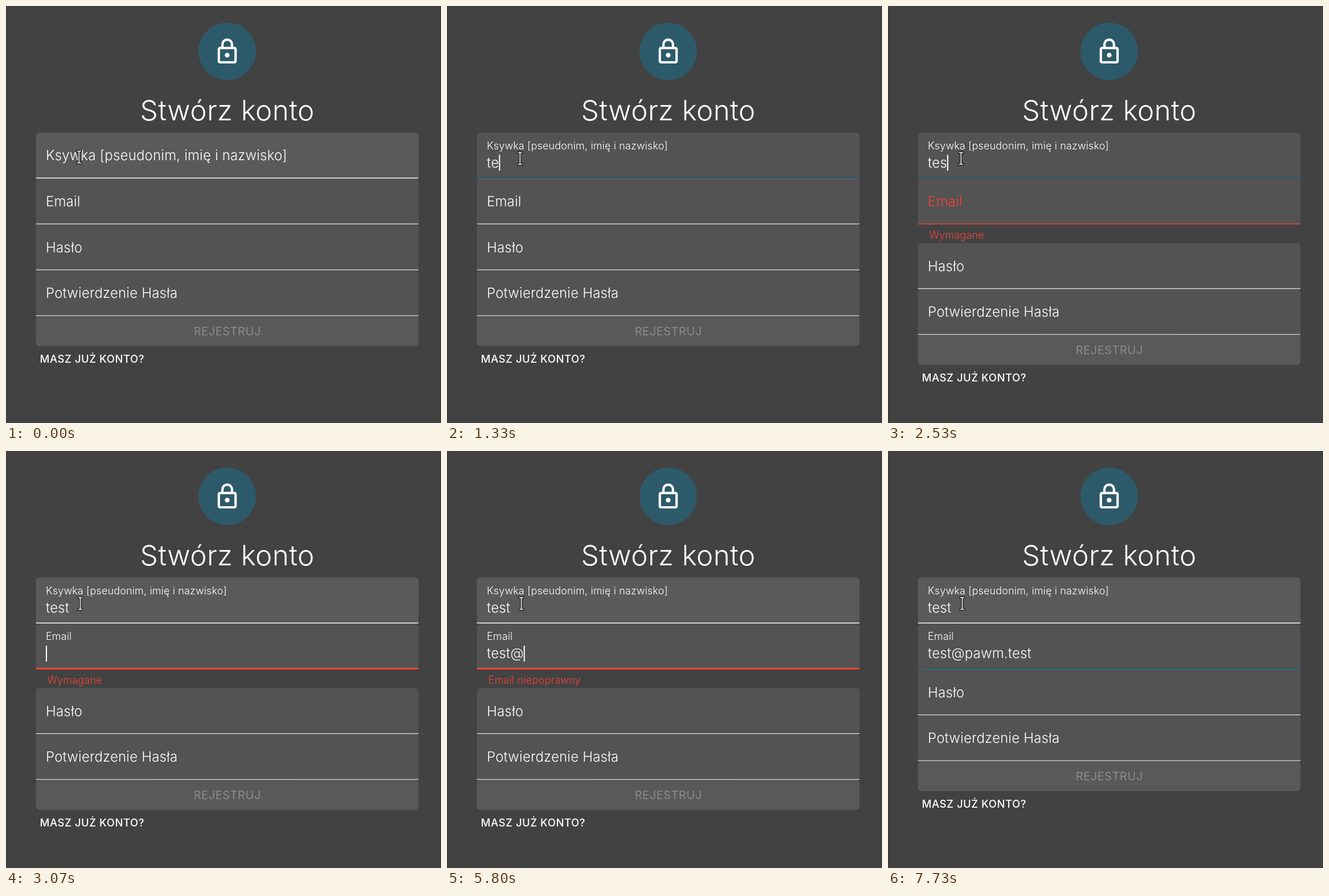
These frames come from a looping animation (764 by 733 pixels, 8 s). An HTML page:

```html
<!DOCTYPE html>
<html lang="pl">
<head>
<meta charset="utf-8">
<title>Stwórz konto</title>
<style>
  html, body { margin: 0; width: 100%; height: 100%; overflow: hidden; background: #424242; }
  svg { display: block; width: 764px; height: 733px; }
  text { font-family: Inter, "Open Sans", sans-serif; fill: #fff; white-space: pre; }
  .title { font-size: 49.5px; font-weight: 300; letter-spacing: .008em; text-anchor: middle; }
  .label, .value { font-size: 24px; font-weight: 350; letter-spacing: .008em; }
  .help { font-size: 18px; font-weight: 350; letter-spacing: .012em; fill: #f44336; }
  .button { font-size: 20px; letter-spacing: .0286em; text-anchor: middle; fill: #8b8b8b; }
  .link { font-size: 18.5px; font-weight: 500; letter-spacing: .0286em; }
</style>
</head>
<body>
<svg id="stage" viewBox="0 0 764 733">
  <defs>
    <path id="beam" d="M-3 -10.5H-1.5L0 -9.5L1.5 -10.5H3M0 -9.5V9.5M-3 10.5H-1.5L0 9.5L1.5 10.5H3"/>
  </defs>
  <rect width="764" height="733" fill="#424242"/>
  <rect x=".5" y=".5" width="763" height="733" fill="none" stroke="#383838"/>
  <circle cx="388.5" cy="79.7" r="50.5" fill="#2d5a6a"/>
  <g transform="translate(363.3 54.9) scale(2.1)" fill="none" stroke="#fff" stroke-width="2">
    <rect x="5" y="9" width="14" height="12" rx="1"/>
    <path d="M8 9V6a4 4 0 0 1 8 0V9"/>
    <circle cx="12" cy="15" r="2" fill="#fff" stroke="none"/>
  </g>
  <text class="title" x="388.7" y="200.8">Stwórz konto</text>
  <g id="fields"></g>
  <g id="footer">
    <rect x="52.5" y="545.2" width="672" height="52.6" rx="6" fill="#595959"/>
    <text class="button" x="388.8" y="579.2">REJESTRUJ</text>
    <text class="link" x="59.6" y="626.7">MASZ JUŻ KONTO?</text>
  </g>
  <g id="pointer" fill="none" stroke-linecap="square">
    <use href="#beam" stroke="#111" stroke-width="4"/>
    <use href="#beam" stroke="#fff" stroke-width="1.6"/>
  </g>
</svg>
<script>
const LOOP = 8000, FPS = 15, FADE = 200;
const LEFT = 52.5, TOP = 222.5, WIDTH = 672, PITCH = 80.67, HELP_GAP = 33;
const RED = [244, 67, 54], WHITE = [255, 255, 255], TEAL = '#2c5a69';
const $ = id => document.getElementById(id);

// Every track is a list of [time, value] steps.
const FIELDS = [
  {
    label: 'Ksywka [pseudonim, imię i nazwisko]',
    hover: true,
    focus: [[430, 1], [1340, 0], [2160, 1], [2830, 0]],
    raised: [[430, 1]],
    red: [[1400, 1], [2160, 0]],
    error: [[1400, 1], [2470, 0]],
    text: [[930, 't'], [1130, 'te'], [2470, 'tes'], [2600, 'test']],
    help: [[0, 'Ksywka za krótka - Co najmniej 3 znaki']]
  },
  {
    label: 'Email',
    focus: [[1340, 1], [2160, 0], [2830, 1]],
    raised: [[1340, 1], [2160, 0], [2830, 1]],
    red: [[2160, 1], [2830, 0]],
    error: [[2160, 1], [6670, 0], [7330, 1], [7470, 0]],
    text: [[4870, 't'], [4930, 'te'], [5000, 'tes'], [5070, 'test'], [5800, 'test@'],
      [6670, 'test@p'], [6870, 'test@pa'], [7000, 'test@paw'], [7200, 'test@pawm'],
      [7330, 'test@pawm.'], [7470, 'test@pawm.t'], [7600, 'test@pawm.tes'], [7730, 'test@pawm.test']],
    help: [[0, 'Wymagane'], [4870, 'Email niepoprawny']]
  },
  { label: 'Hasło' },
  { label: 'Potwierdzenie Hasła' }
];
const CARET = [[0, 1], [4070, 0], [4870, 1], [5270, 0], [5800, 1], [6470, 0], [6670, 1], [7730, 0]];
const POINTER = [[0, '128.3 265.5'], [70, '128.3 268'], [2600, '130.5 268']];

function at(track, t, start = 0) {
  let value = start;
  for (const [time, v] of track || []) if (t >= time) value = v;
  return value;
}

// cubic-bezier(0, 0, .2, 1)
function easeOut(x) {
  let lo = 0, hi = 1;
  for (let i = 0; i < 20; i++) {
    const s = (lo + hi) / 2;
    if (.6 * (1 - s) * s * s + s ** 3 < x) lo = s; else hi = s;
  }
  return 3 * (1 - lo) * lo * lo + lo ** 3;
}
const easeInOut = x => x * x * (3 - 2 * x);

function fade(track, t, ease = easeOut) {
  let value = 0;
  for (const [time, v] of track || []) {
    if (t < time) break;
    value += (v - value) * ease(Math.min(1, (t - time) / FADE));
  }
  return value;
}

const mix = (a, b, p) => a.map((v, i) => Math.round(v + (b[i] - v) * p)).join();

function add(parent, tag, attrs = {}) {
  const node = document.createElementNS('http://www.w3.org/2000/svg', tag);
  for (const name in attrs) node.setAttribute(name, attrs[name]);
  return parent.appendChild(node);
}

const views = FIELDS.map(field => {
  const g = add($('fields'), 'g');
  const view = {
    g,
    box: add(g, 'path', { d: `M0 80.6V6a6 6 0 0 1 6 -6H${WIDTH - 6}a6 6 0 0 1 6 6V80.6Z`, fill: '#fff' }),
    thin: add(g, 'rect', { y: 79.2, width: WIDTH, height: 1.44 }),
    thick: add(g, 'rect', { y: 77.8, height: 2.88 }),
    label: add(g, 'text', { class: 'label' }),
    value: add(g, 'text', { class: 'value', x: 17.5, y: 61.3 }),
    caret: add(g, 'rect', { y: 39, width: 2, height: 28, fill: '#fff' }),
    help: add(g, 'text', { class: 'help', x: 20, y: 106 })
  };
  view.label.textContent = field.label;
  return view;
});

function setText(node, text) {
  if (node.textContent !== text) node.textContent = text;
}

function drawField(field, view, y, t) {
  const focus = fade(field.focus, t), raised = fade(field.raised, t);
  const error = at(field.error, t), text = at(field.text, t, '');
  view.g.setAttribute('transform', `translate(${LEFT} ${y})`);
  view.box.setAttribute('fill-opacity', field.hover ? .13 - .04 * focus : .09);

  const lineRed = fade(field.error, t, easeInOut);
  view.thin.setAttribute('fill', `rgb(${mix(WHITE, RED, lineRed)})`);
  view.thin.setAttribute('fill-opacity', field.hover ? 1 : .75 + .25 * lineRed);
  view.thick.setAttribute('x', WIDTH * (1 - focus) / 2);
  view.thick.setAttribute('width', WIDTH * focus);
  view.thick.setAttribute('fill', error ? `rgb(${RED})` : TEAL);

  view.label.setAttribute('transform', `translate(17.5 ${48.8 - 19.8 * raised}) scale(${1 - .25 * raised})`);
  view.label.style.fill = `rgb(${mix(WHITE, RED, fade(field.red, t))})`;

  setText(view.value, text);
  setText(view.help, error ? at(field.help, t, '') : '');
  const caretOn = at(field.focus, t) && at(CARET, t);
  view.caret.setAttribute('visibility', caretOn ? 'visible' : 'hidden');
  view.caret.setAttribute('x', 17.5 + (text ? view.value.getComputedTextLength() : 0));
}

function draw(now) {
  const step = Math.floor((now % LOOP + 4) * FPS / 1000);
  const t = Math.round(step * 100 / FPS) * 10 % LOOP;
  let shift = 0;
  FIELDS.forEach((field, i) => {
    drawField(field, views[i], TOP + i * PITCH + shift, t);
    if (at(field.error, t)) shift += HELP_GAP;
  });
  $('footer').setAttribute('transform', `translate(0 ${shift})`);
  $('pointer').setAttribute('transform', `translate(${at(POINTER, t)})`);
}

const begin = performance.now();
function tick() {
  draw(performance.now() - begin);
  requestAnimationFrame(tick);
}
tick();
</script>
</body>
</html>
```
